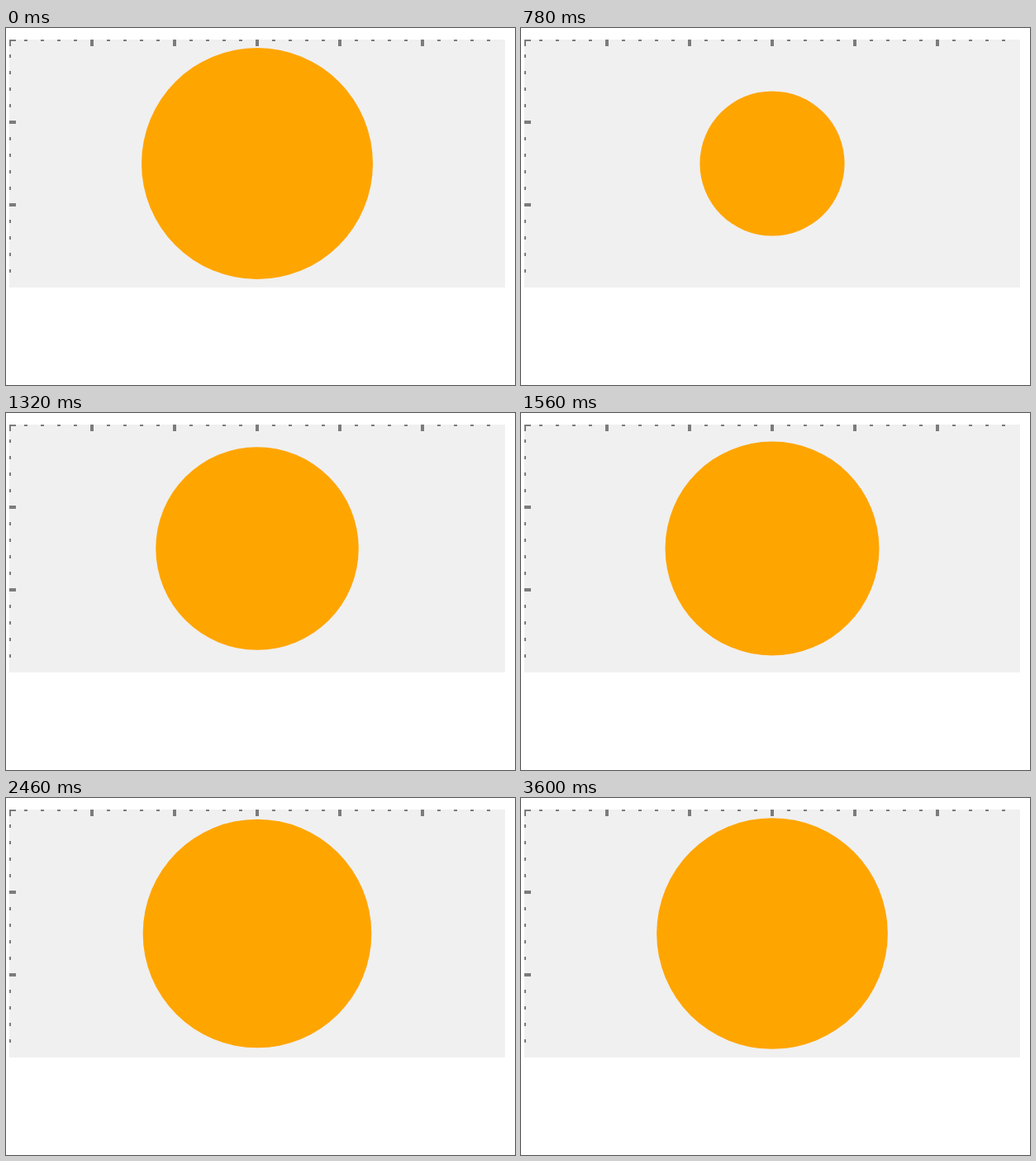
Recreate the animation shown at these times as an HTML page with a canvas. Size 616x432 px, loop 3660 ms.

```html
<!DOCTYPE html>
<html lang="en">
<head>
<meta charset="utf-8">
<title>Easing circle</title>
<style>
  html, body { margin: 0; width: 100%; height: 100%; overflow: hidden; background: #fff; }
  canvas { display: block; }
</style>
</head>
<body>
<canvas id="stage" width="616" height="432"></canvas>
<script>
const ctx = document.getElementById('stage').getContext('2d');
const LOOP = 3660, STEP = 60, HOLD = 540;
const AREA = { x: 4, y: 14, w: 600, h: 300 };
const FULL_RADIUS = 140, START_GAP = 85.9, DECAY = 0.1235;

// The circle rests at full size, then restarts small and eases back out.
function radiusAt(time) {
  if (time < HOLD) return FULL_RADIUS;
  const step = Math.floor((time - HOLD) / STEP);
  return FULL_RADIUS - START_GAP * Math.exp(-DECAY * step);
}

function drawRulers() {
  ctx.fillStyle = '#7c7c7c';
  for (let pos = 0; pos < AREA.w; pos += 20) {
    const length = pos % 100 ? 2 : 8;
    const start = Math.max(pos - 2, 0);
    const size = pos + 2 - start;
    ctx.fillRect(AREA.x + start, AREA.y, size, length);
    if (pos < AREA.h) ctx.fillRect(AREA.x, AREA.y + start, length, size);
  }
}

function draw(time) {
  ctx.fillStyle = '#fff';
  ctx.fillRect(0, 0, 616, 432);
  ctx.fillStyle = '#f0f0f0';
  ctx.fillRect(AREA.x, AREA.y, AREA.w, AREA.h);
  drawRulers();
  ctx.fillStyle = '#ffa500';
  ctx.beginPath();
  ctx.arc(AREA.x + AREA.w / 2, AREA.y + AREA.h / 2, radiusAt(time), 0, Math.PI * 2);
  ctx.fill();
}

const began = performance.now();
function tick() {
  draw((performance.now() - began) % LOOP);
  requestAnimationFrame(tick);
}
tick();
</script>
</body>
</html>
```
